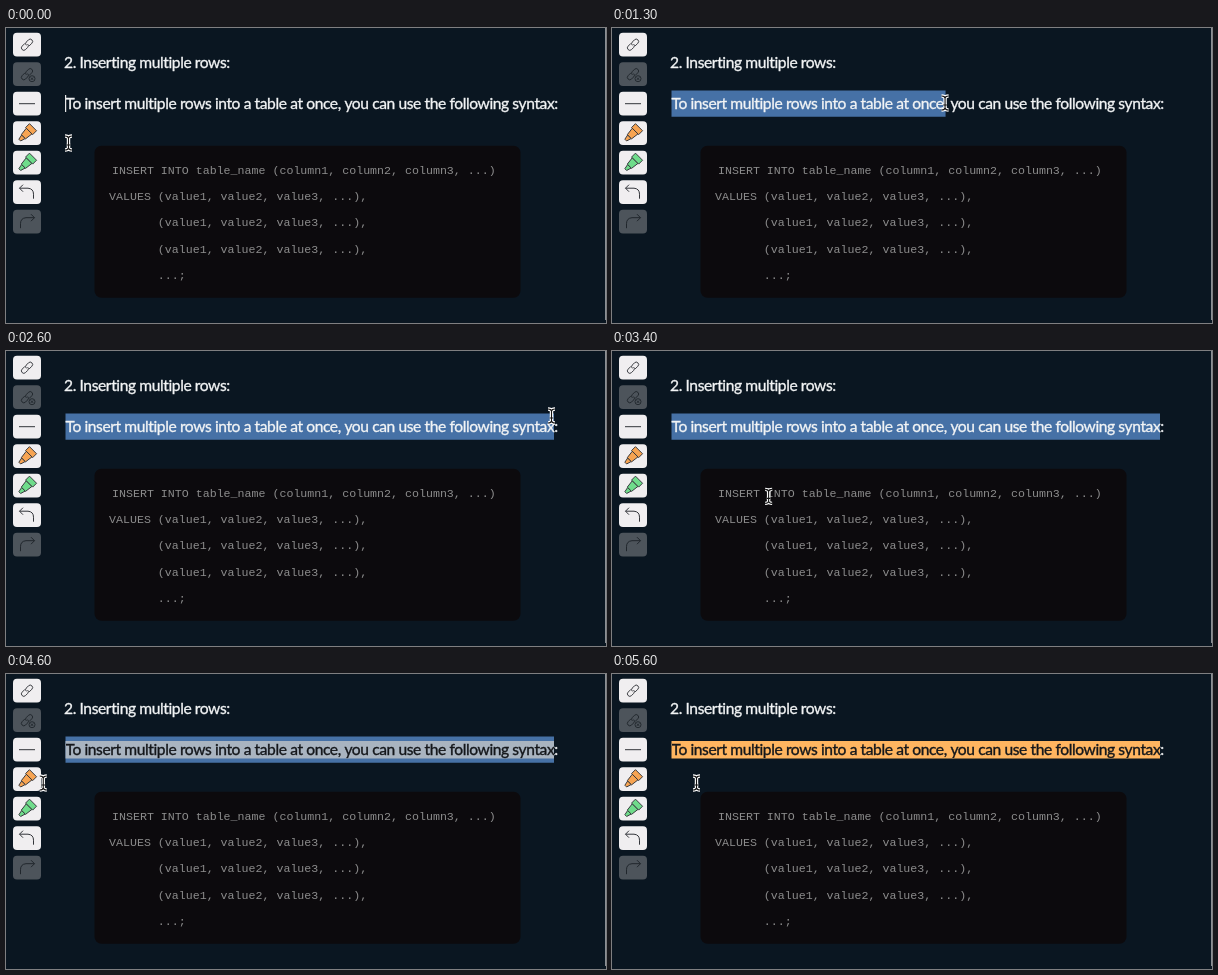
Write an HTML page with a canvas that moves like this. It is 600 px wide and 295 px high and loops after 6000 ms.

```html
<!DOCTYPE html>
<html lang="en">
<head>
<meta charset="utf-8">
<title>Highlighting a line</title>
<style>
html, body { margin: 0; width: 100%; height: 100%; overflow: hidden; background: #0a1621; }
canvas { display: block; }
</style>
</head>
<body>
<canvas id="stage" width="600" height="295"></canvas>
<script>
const ctx = document.getElementById('stage').getContext('2d');
const LOOP = 6000, STEP = 100;
const LINE = 'To insert multiple rows into a table at once, you can use the following syntax:';
const list = name => [1, 2, 3].map(n => name + n).join(', ') + ', ...';
const row = ' '.repeat(7) + `(${list('value')}),`;
const CODE = [
  `INSERT INTO table_name (${list('column')})`,
  row.replace(/^ +/, 'VALUES '), row, row, ' '.repeat(7) + '...;'
];
const LEFT = 59.5, RIGHT = 548, WIDTH = RIGHT - LEFT;
const PRESS = 1000, MARK = 4200, CLICK = 5100;
const INK = '#33353a', DIM = '#20262c';

const progress = (t, from, to) => Math.min(1, Math.max(0, (t - from) / (to - from)));
const smooth = (...span) => { const p = progress(...span); return p * p * (3 - 2 * p); };
const slowing = (...span) => 1 - (1 - progress(...span)) ** 2.7;

// Up to the line, drag right, arc back to the marker button, out to the page
const pointerX = t => 62.5 + 483 * slowing(t, 980, 2200) - 525 * smooth(t, 2800, 3700)
  + 8 * smooth(t, 3600, 3900) + 56 * smooth(t, 4500, 4900);
const pointerY = t => 115 - 40 * smooth(t, 0, 700) - 10 * smooth(t, 1300, 1700)
  + 84 * smooth(t, 2700, 3500) - 40 * smooth(t, 3500, 3900);

function rect(x, y, w, h, color, r = 0) {
  ctx.fillStyle = color;
  ctx.beginPath();
  ctx.roundRect(x, y, w, h, r);
  ctx.fill();
}

function stroke(d, color, width) {
  ctx.strokeStyle = color;
  ctx.lineWidth = width;
  ctx.stroke(new Path2D(d));
}

function shape(d, fill) {
  ctx.fillStyle = fill;
  ctx.fill(new Path2D(d));
  stroke(d, INK, 0.9);
}

function at(x, y, draw, angle = 0) {
  ctx.save();
  ctx.translate(x, y);
  ctx.rotate(angle);
  draw();
  ctx.restore();
}

function sans(text, x, y, color) {
  ctx.font = '15.6px Lato, "Open Sans", sans-serif';
  ctx.letterSpacing = '-0.4px';
  ctx.fillStyle = ctx.strokeStyle = color;
  ctx.lineWidth = 0.35;
  ctx.fillText(text, x, y);
  ctx.strokeText(text, x, y);
}

function link(color) {
  const half = 'M-0.5 -2.4H-4.5A2.4 2.4 0 0 0 -4.5 2.4H-1.5A2.4 2.4 0 0 0 0.9 0';
  at(0, 0, () => {
    stroke(half, color, 0.9);
    ctx.rotate(Math.PI);
    stroke(half, color, 0.9);
  }, -Math.PI / 4);
}

function unlink() {
  link(DIM);
  stroke('M2 4.5A3 3 0 1 0 8 4.5A3 3 0 1 0 2 4.5M3.8 3.3L6.2 5.7M6.2 3.3L3.8 5.7', DIM, 0.9);
}

function marker(color) {
  at(0, 0, () => {
    shape('M-10 -1.5L-5 -2.5V2.5L-10 1Z', color);
    shape('M-5 -3L3 -4V4L-5 3Z', color);
    shape('M3 -5H8.5V5H3Z', color);
  }, -Math.PI / 4);
}

const undo = color => stroke('M-4 -7.5L-7.5 -4L-4 -0.5M-7.5 -4H1Q6.5 -3.5 6.5 2V6.5', color, 1);

const BUTTONS = [
  () => link(INK),
  unlink,
  () => stroke('M-8 0H8', INK, 1),
  () => marker('#f7a452'),
  () => marker('#6fdc8b'),
  () => undo(INK),
  () => { ctx.scale(-1, 1); undo(DIM); }
];

function ibeam() {
  const d = 'M-3.5 -7Q-0.5 -7 0 -5Q0.5 -7 3.5 -7M0 -5V5M-3.5 7Q-0.5 7 0 5Q0.5 7 3.5 7M-1.8 2H1.8';
  stroke(d, '#fff', 3.4);
  stroke(d, '#111', 1.1);
}

function hand() {
  shape('M-3 2V-6.5Q-1.8 -8.4 -0.6 -6.5V-2Q0.8 -3.2 1.8 -1.7Q3.2 -2.7 4.1 -1.1Q5.8 -1.8 6.4 0V3Q6.2 5 5 7H-2Q-3.5 4.5 -6 1.7Q-6.5 -0.3 -4.5 0.2Z', '#fff');
  stroke('M-0.6 -2V1M1.8 -1.7V1.2M4.1 -1.1V1.4', INK, 0.8);
}

function drawPage() {
  rect(0, 0, 600, 295, '#0a1621');
  rect(599, 0, 1, 292, '#8b8f94');
  rect(88.5, 117.7, 426, 152, '#0c0a0d', 7);

  BUTTONS.forEach((icon, i) => {
    const top = 4.7 + 29.5 * i;
    rect(7, top, 28, 23.8, icon === unlink || i === 6 ? '#4d545b' : '#f0eef0', 4);
    at(21, top + 12, icon);
  });

  ctx.font = '11.63px "Liberation Mono", "Courier New", monospace';
  ctx.letterSpacing = '0px';
  ctx.fillStyle = '#8c8c8c';
  CODE.forEach((text, i) => ctx.fillText(text, i ? 103 : 106, 146 + i * 26.2));
  sans('2. Inserting multiple rows:', 58, 40, '#f2f4f5');
}

function drawLine(t, end) {
  const selecting = t >= PRESS && t < CLICK;
  if (selecting) rect(LEFT, 62.5, end - LEFT, 26.3, '#4671a6');
  sans(LINE, LEFT, 81, '#f2f4f5');
  if (t < MARK) return;
  rect(LEFT, 67, WIDTH, 17.5, selecting ? '#a9b4c0' : '#ffb560');
  ctx.save();
  ctx.beginPath();
  ctx.rect(LEFT, 62, WIDTH, 27);
  ctx.clip();
  sans(LINE, LEFT, 81, '#14171b');
  ctx.restore();
}

function render(t) {
  const x = pointerX(t), y = pointerY(t);
  drawPage();
  drawLine(t, t < 2300 ? Math.min(x + 0.5, RIGHT) : RIGHT);
  if (t < 300 || (t >= 800 && t < PRESS)) rect(59, 67, 1.2, 17, '#e8e8e8');
  if (t >= CLICK && t < CLICK + 500) rect(105.5, 135, 1, 14, '#d8d8d8');
  at(x, y, x < 36 ? hand : ibeam);
}

function tick(now) {
  render(Math.floor(now % LOOP / STEP) * STEP);
  requestAnimationFrame(tick);
}
render(0);
requestAnimationFrame(tick);
</script>
</body>
</html>
```
